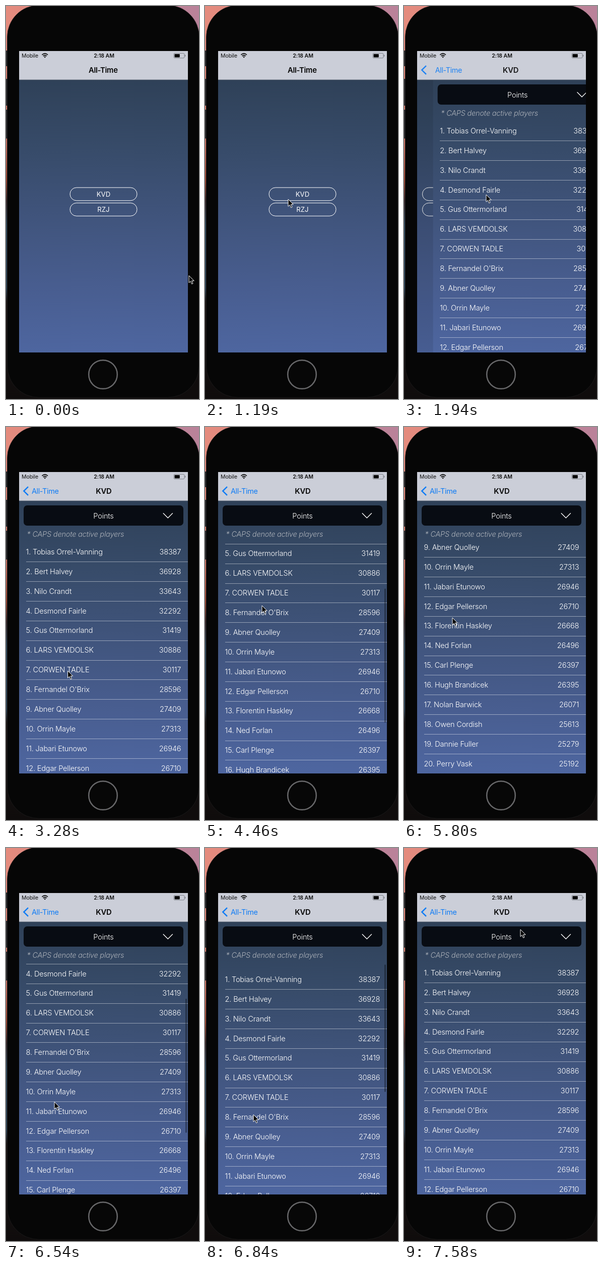
Recreate the animation shown at these times as an HTML page. Size 383x777 px, loop 8 s.

```html
<!DOCTYPE html>
<html lang="en">
<head>
<meta charset="utf-8">
<title>All-Time leaders</title>
<style>
  html, body { margin: 0; width: 100%; height: 100%; overflow: hidden; background: #0b0909; }
  svg { display: block; width: 100vw; height: 100vh; }
  text { font-family: Inter, Roboto, "Liberation Sans", sans-serif; white-space: pre; }
  .mid { text-anchor: middle; }
  .end { text-anchor: end; }
  .body { font-size: 14.6px; font-weight: 300; letter-spacing: -.2px; fill: #fff; }
  .title { font-size: 14.8px; font-weight: 600; letter-spacing: -.3px; fill: #050505; }
  .back { font-size: 14.4px; letter-spacing: -.35px; fill: #0f7cf5; }
  .status { font-size: 10.6px; letter-spacing: -.1px; fill: #111; }
  .pill rect { fill: none; stroke: #fff; stroke-width: 1; }
  .pill text { font-size: 13.2px; fill: #fff; }
  .note { font-size: 14.5px; font-style: italic; fill: #aeb3bb; }
  .line { fill: #fff; opacity: .45; shape-rendering: crispEdges; }
</style>
</head>
<body>
<svg viewBox="0 0 383 777" preserveAspectRatio="none">
  <defs>
    <linearGradient id="sky" x1="0" x2="1" y1="0" y2="0">
      <stop offset="0" stop-color="#e58b7d"/>
      <stop offset="1" stop-color="#b9829a"/>
    </linearGradient>
    <linearGradient id="edge" x1="0" x2="0" y1="0" y2="1">
      <stop offset="0" stop-color="#e0887a"/>
      <stop offset=".27" stop-color="#c56f60"/>
      <stop offset=".37" stop-color="#9a4632"/>
      <stop offset=".43" stop-color="#3a2a2c"/>
      <stop offset=".5" stop-color="#31495c"/>
      <stop offset=".68" stop-color="#2e4355"/>
      <stop offset=".72" stop-color="#1b1413"/>
      <stop offset="1" stop-color="#0f0c0c"/>
    </linearGradient>
    <linearGradient id="page" gradientUnits="userSpaceOnUse" x1="0" x2="0" y1="146" y2="685">
      <stop offset="0" stop-color="#2f4158"/>
      <stop offset=".25" stop-color="#374b69"/>
      <stop offset=".5" stop-color="#40547c"/>
      <stop offset=".75" stop-color="#485d8f"/>
      <stop offset="1" stop-color="#4e66a0"/>
    </linearGradient>
    <clipPath id="screen"><rect x="26" y="89" width="335" height="596"/></clipPath>
    <clipPath id="table"><rect x="26" y="227.6" width="335" height="457.4"/></clipPath>
  </defs>

  <!-- desktop and handset -->
  <rect width="383" height="777" fill="#0f0c0c"/>
  <rect width="383" height="90" fill="url(#sky)"/>
  <rect y="90" width="80" height="687" fill="url(#edge)"/>
  <g fill="#2b2b2d">
    <rect y="88" width="4" height="31"/>
    <rect y="144" width="4" height="53"/>
    <rect y="205" width="4" height="57"/>
  </g>
  <rect x="2.5" y="-1.5" width="381" height="775.5" rx="63" fill="#060606" stroke="#1d1d1e" stroke-width=".8"/>
  <circle cx="192.5" cy="728.5" r="28.3" fill="#070707" stroke="#68686a" stroke-width="2.5"/>

  <g clip-path="url(#screen)">
    <g id="home">
      <rect x="26" y="146" width="335" height="539" fill="url(#page)"/>
      <g class="pill">
        <rect x="127" y="359" width="133" height="25.8" rx="12.9"/>
        <text id="pick" class="mid" x="193.5" y="376.8">KVD</text>
        <rect x="127" y="389.4" width="133" height="25.8" rx="12.9"/>
        <text class="mid" x="193.5" y="407.2">RZJ</text>
      </g>
    </g>
    <rect id="dim" x="26" y="146" width="335" height="539" opacity="0"/>

    <g id="list">
      <rect x="26" y="146" width="335" height="539" fill="url(#page)"/>
      <rect x="35" y="155" width="317" height="40" rx="7" fill="#080c13"/>
      <text class="body mid" x="193.5" y="180.6">Points</text>
      <path d="M311.8 170.3L321.3 179.8L330.8 170.3" fill="none" stroke="#fff" stroke-width="1.3"/>
      <text class="body note" x="41.5" y="217">* CAPS denote active players</text>
      <g clip-path="url(#table)"><g id="rows"></g></g>
      <rect id="bar" x="356.2" width="2.5" rx="1.2" fill="#000" fill-opacity=".42"/>
    </g>

    <!-- status and navigation bar -->
    <rect x="26" y="89" width="335" height="57" fill="#cbced8"/>
    <rect x="26" y="145.6" width="335" height=".8" fill="#59636f"/>
    <text class="status" x="31" y="102">Mobile</text>
    <g fill="none" stroke="#111" stroke-width="1.7">
      <path d="M71.4 96.6Q77.2 91.4 83 96.6"/>
      <path d="M73.7 99Q77.2 96 80.7 99"/>
    </g>
    <path d="M77.2 102.6L75.2 100.5Q77.2 99 79.2 100.5Z" fill="#111"/>
    <text class="status mid" x="194.5" y="102" font-weight="600">2:18 AM</text>
    <rect x="333" y="93.5" width="21" height="9.4" rx="2" fill="none" stroke="#777b82" stroke-width=".9"/>
    <rect x="334.5" y="95" width="10.3" height="6.4" rx=".8" fill="#050505"/>
    <rect x="354.9" y="96.6" width="1.3" height="3.2" rx=".6" fill="#777b82"/>
    <g id="back" opacity="0">
      <path d="M44 118.2L35.4 126.6L44 135" fill="none" stroke="#0f7cf5" stroke-width="2.5"/>
      <text id="backText" class="back" y="132">All-Time</text>
    </g>
    <text id="oldTitle" class="title" y="132">All-Time</text>
    <text id="newTitle" class="title mid" y="132" opacity="0">KVD</text>
  </g>

  <path id="cursor" d="M0 0V14.2L3.3 11.2L5.6 16.6L8 15.6L5.7 10.3H10.2Z" fill="#050505" stroke="#fff" stroke-width="1" stroke-linejoin="round"/>
</svg>

<script>
const $ = id => document.getElementById(id);
const NS = "http://www.w3.org/2000/svg";
const LOOP = 8000, STEP = 148.6;   // the screen refreshes once per STEP
const ROW = 38.87, PUSH_AT = 1715, WIDTH = 335;

const players = [
  ["Tobias Orrel-Vanning", 38387], ["Bert Halvey", 36928],
  ["Nilo Crandt", 33643], ["Desmond Fairle", 32292],
  ["Gus Ottermorland", 31419], ["LARS VEMDOLSK", 30886],
  ["CORWEN TADLE", 30117], ["Fernandel O'Brix", 28596],
  ["Abner Quolley", 27409], ["Orrin Mayle", 27313],
  ["Jabari Etunowo", 26946], ["Edgar Pellerson", 26710],
  ["Florentin Haskley", 26668], ["Ned Forlan", 26496],
  ["Carl Plenge", 26397], ["Hugh Brandicek", 26395],
  ["Nolan Barwick", 26071], ["Owen Cordish", 25613],
  ["Dannie Fuller", 25279], ["Perry Vask", 25192]
];

function add(parent, tag, attrs, text = "") {
  const el = document.createElementNS(NS, tag);
  set(el, attrs);
  el.textContent = text;
  parent.append(el);
}

function set(el, attrs) {
  for (const key in attrs) el.setAttribute(key, attrs[key]);
}

players.forEach(([name, points], i) => {
  const y = i * ROW, rows = $("rows");
  add(rows, "text", { class: "body", x: 39.6, y: 252 + y }, `${i + 1}. ${name}`);
  add(rows, "text", { class: "body end", x: 347.3, y: 252 + y }, points);
  add(rows, "rect", { class: "line", x: 39.5, y: 266.2 + y, width: 322, height: 1 });
});

// Tracks are [step, value, ...]; values between keys are linear.
const cursorTrack = [
  [1, 363, 533], [2, 196, 510], [3, 196, 510], [4, 194, 500], [6, 182, 448],
  [8, 165, 382], [9, 163, 373], [18, 163, 373], [20, 140, 435], [21, 126, 474],
  [22, 122.5, 482], [27, 122.5, 482], [28, 121, 474], [30, 113, 353],
  [31, 110, 345], [35, 97, 375], [36, 96, 377], [41, 96, 377], [42, 96, 392],
  [44, 96, 502], [45, 96, 527], [47, 96, 527], [48, 130, 400],
  [49, 189, 193], [50, 226, 166], [51, 231, 161]
];
const scrollTrack = [
  [27, 0], [28, 28], [30, 152], [31, 207], [32, 248], [33, 277], [34, 297],
  [35, 310], [36, 317], [37, 320], [41, 320], [42, 300], [43, 225],
  [44, 115], [45, 15], [46, -13], [47, -6], [48, -1], [49, 0]
];
const barTrack = [
  [27, 0], [28, 1], [37, 1], [39, 0], [41, 0], [42, 1], [49, 1], [51, 0]
];

function at(track, k) {
  const n = track.findIndex(key => key[0] > k);
  if (n === 0) return track[0].slice(1);
  if (n < 0) return track[track.length - 1].slice(1);
  const a = track[n - 1], b = track[n], f = (k - a[0]) / (b[0] - a[0]);
  return a.slice(1).map((v, i) => v + (b[i + 1] - v) * f);
}

// Critically damped spring: share of the push still to go
function pushLeft(ms) {
  const w = Math.max(0, ms - PUSH_AT) * .01826;
  const left = (1 + w) * Math.exp(-w);
  return left < .003 ? 0 : left;
}

function draw(ms) {
  const k = Math.floor((ms + 5) / STEP);
  const left = pushLeft(k * STEP), done = 1 - left;

  set($("home"), { transform: `translate(${-done * 100} 0)` });
  set($("list"), { transform: `translate(${left * WIDTH} 0)` });
  set($("dim"), { opacity: done * .1 });
  set($("pick"), { opacity: k === 11 ? .3 : 1 });

  const labelX = 51 + 113 * left;
  set($("back"), { opacity: done });
  set($("backText"), { x: labelX });
  set($("oldTitle"), { x: labelX, opacity: Math.max(0, 1 - 2 * done) });
  set($("newTitle"), { x: 193.8 + 188 * left, opacity: done });

  const [scroll] = at(scrollTrack, k);
  set($("rows"), { transform: `translate(0 ${-scroll})` });
  set($("bar"), {
    y: 230.5 + Math.max(0, scroll) * .586,
    height: 265 + Math.min(0, scroll) * 1.02,
    opacity: at(barTrack, k)[0]
  });

  const [x, y] = at(cursorTrack, k);
  set($("cursor"), { transform: `translate(${x} ${y})` });
}

const start = performance.now();
function frame() {
  draw((performance.now() - start) % LOOP);
  requestAnimationFrame(frame);
}
frame();
</script>
</body>
</html>
```
